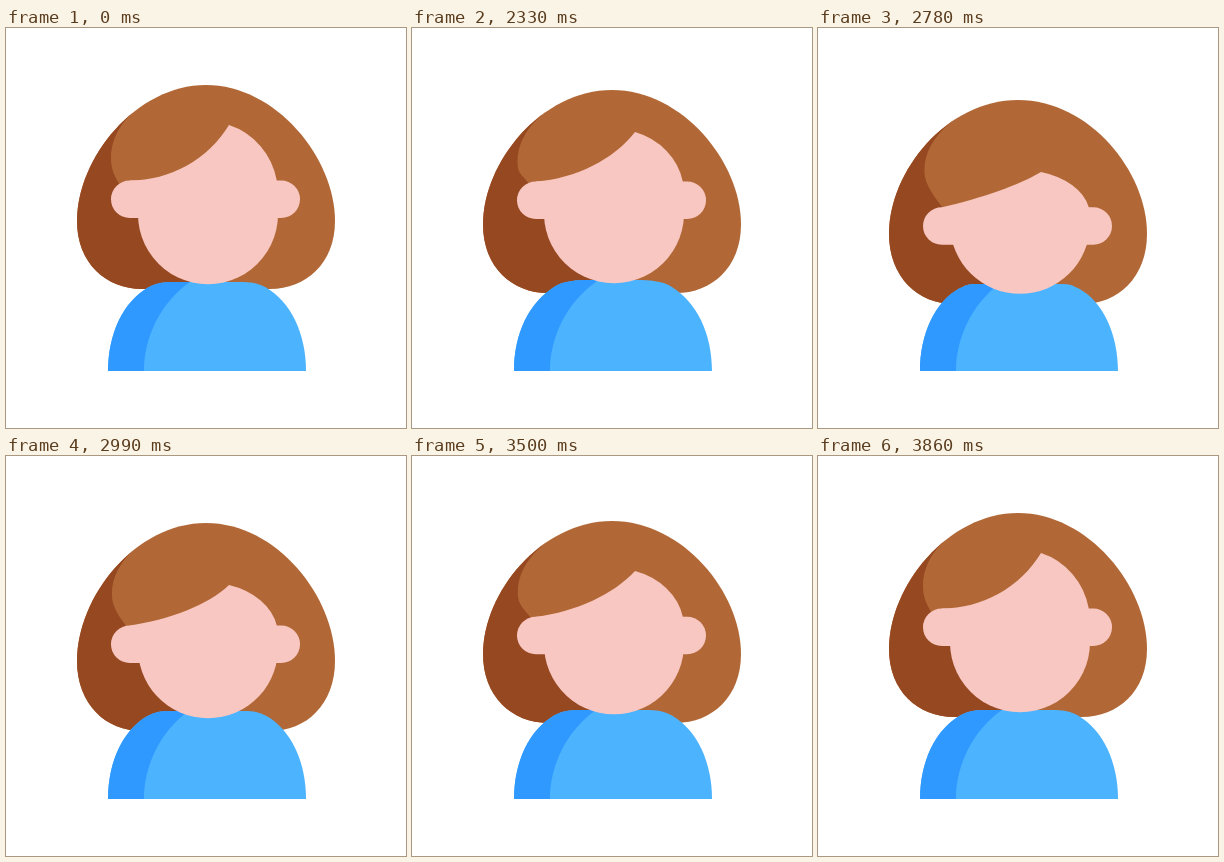
Recreate the animation shown at these times as an HTML page. Size 400 by 400 pixels, loop 4040 ms.

```html
<!DOCTYPE html>
<html lang="en">
<head>
<meta charset="utf-8">
<title>Nodding figure</title>
<style>
html, body { margin: 0; width: 100%; height: 100%; overflow: hidden; background: #fff; }
svg { display: block; width: 100vw; height: 100vh; }
</style>
</head>
<body>
<svg viewBox="0 0 400 400">
  <clipPath id="hairClip"><path id="hairClipPath"/></clipPath>
  <clipPath id="bodyClip"><path id="bodyClipPath"/></clipPath>
  <path id="hair" fill="#b16836"/>
  <path id="hairShade" fill="#964821" clip-path="url(#hairClip)"/>
  <path id="body" fill="#4cb3ff"/>
  <path id="bodyShade" fill="#3099ff" clip-path="url(#bodyClip)"/>
  <g fill="#f8c7c1">
    <path id="jaw"/>
    <rect id="ears" x="105" width="189" height="37.5" rx="18.75"/>
    <path id="brow"/>
  </g>
</svg>
<script>
const LOOP = 4040, START = 2030, END = 3860, STEP = 30;

// time, then vertical offsets: hair top, hair bottom, ears, parting, chin, shoulders
const KEYS = [
  [2000, 0, 0, 0, 0, 0, 0],
  [2030, 0, 0, -2, -2, -1, -1],
  [2180, 0.5, 0, -8, -7, -4, -3],
  [2330, 5, 4, 1, 7, -1, -2],
  [2570, 20, 16.5, 36.2, 62, 13, 3],
  [2600, 20.2, 16.8, 37, 63, 13.3, 3.2],
  [2960, 10, 13, 16.5, 31, 5.8, 1],
  [2990, 10, 14, 17, 32, 6, 1],
  [3250, 20, 16.5, 36.2, 62, 13, 3],
  [3500, 8, 6, 8.2, 18, 2, 0],
  [3680, 0.5, 0.5, -2, -1, -1, -0.5],
  [3860, 0, 0, 0, 0, 0, 0]
];
const TRACKS = [1, 2, 3, 4, 5, 6];

const slope = (i, c) => (KEYS[i + 1][c] - KEYS[i][c]) / (KEYS[i + 1][0] - KEYS[i][0]);

// Monotone tangent: flat at turning points and at both ends
function tangent(i, c) {
  if (i === 0 || i === KEYS.length - 1) return 0;
  const a = slope(i - 1, c), b = slope(i, c);
  return a * b > 0 ? 2 * a * b / (a + b) : 0;
}

function valueAt(time, c) {
  let i = 0;
  while (i < KEYS.length - 2 && time >= KEYS[i + 1][0]) i++;
  const span = KEYS[i + 1][0] - KEYS[i][0];
  const u = (time - KEYS[i][0]) / span, v = 1 - u;
  return v * v * (1 + 2 * u) * KEYS[i][c] + u * u * (3 - 2 * u) * KEYS[i + 1][c]
    + span * u * v * (v * tangent(i, c) - u * tangent(i + 1, c));
}

const el = id => document.getElementById(id);
const setPath = (id, d) => el(id).setAttribute('d', d);

function drawHair(h, low, earTop) {
  const top = 57 + h, bottom = 261 + low, side = 193 + low * 0.85;
  const upper = top + (side - top) * 0.537, lower = side + (bottom - side) * 0.62;
  const wide = 130 - h * 0.1;
  const d = `M200 ${top}C${400 - wide} ${top} 329 ${upper} 329 ${side}
    C329 ${lower} 300 ${bottom} 264 ${bottom}H136
    C100 ${bottom} 71 ${lower} 71 ${side}C71 ${upper} ${wide} ${top} 200 ${top}Z`;
  setPath('hair', d);
  setPath('hairClipPath', d);

  const bulge = 105 + h * 0.1, mid = 130 + h * 0.95;
  setPath('hairShade', `M175 ${58 + h * 0.9}
    C${130 + h} ${72 + h * 0.6} 105 ${100 + h * 0.5} ${bulge} ${mid}
    C${bulge} ${mid + 12} ${bulge + 4 + h * 0.4} ${earTop - 4 - h * 0.4} ${113 + h * 0.9} ${earTop + 3}
    L200 ${earTop + 40}V300H0V0Z`);
}

function drawBody(b) {
  const top = 254 + b, y = 259.5 + b * 0.6, x = 142 - b * 0.6, flat = 168 - b * 4;
  const d = `M102 343C102 306 117 274 ${x} ${y}
    C${x + 8} ${top + 1} ${flat - 10} ${top} ${flat} ${top}H${402 - flat}
    C${412 - flat} ${top} ${394 - x} ${top + 1} ${402 - x} ${y}
    C285 274 300 306 300 343Z`;
  setPath('body', d);
  setPath('bodyClipPath', d);
  setPath('bodyShade', 'M138 343C138 310 154 275 184 254V240H90V343Z');
}

function drawFace(h, earTop, tip, center) {
  const cut = earTop + 18;
  const half = Math.sqrt(70 ** 2 - (cut - center) ** 2);
  setPath('jaw', `M${202 - half} ${cut}A70 70 0 ${cut < center ? 1 : 0} 0 ${202 + half} ${cut}Z`);
  el('ears').setAttribute('y', earTop);
  setPath('brow', `M124 ${earTop}
    C164 ${earTop - h * 0.6} 202 ${tip + 34.5 - h * 1.45} 223 ${tip}
    A70 ${(earTop - tip) * 1.3} 0 0 1 270.8 ${earTop}V${cut + 1}H134Z`);
}

function draw(time) {
  const [h, low, ear, tip, chin, body] = TRACKS.map(c => valueAt(time, c));
  const earTop = 152.5 + ear;
  drawHair(h, low, earTop);
  drawBody(body);
  drawFace(h, earTop, 97 + tip, 186.3 + chin);
}

const origin = performance.now();
function tick() {
  const t = (performance.now() - origin) % LOOP;
  const held = START + Math.floor((t - START) / STEP) * STEP;
  draw(t < START || t >= END ? END : held);
  requestAnimationFrame(tick);
}
tick();
</script>
</body>
</html>
```
